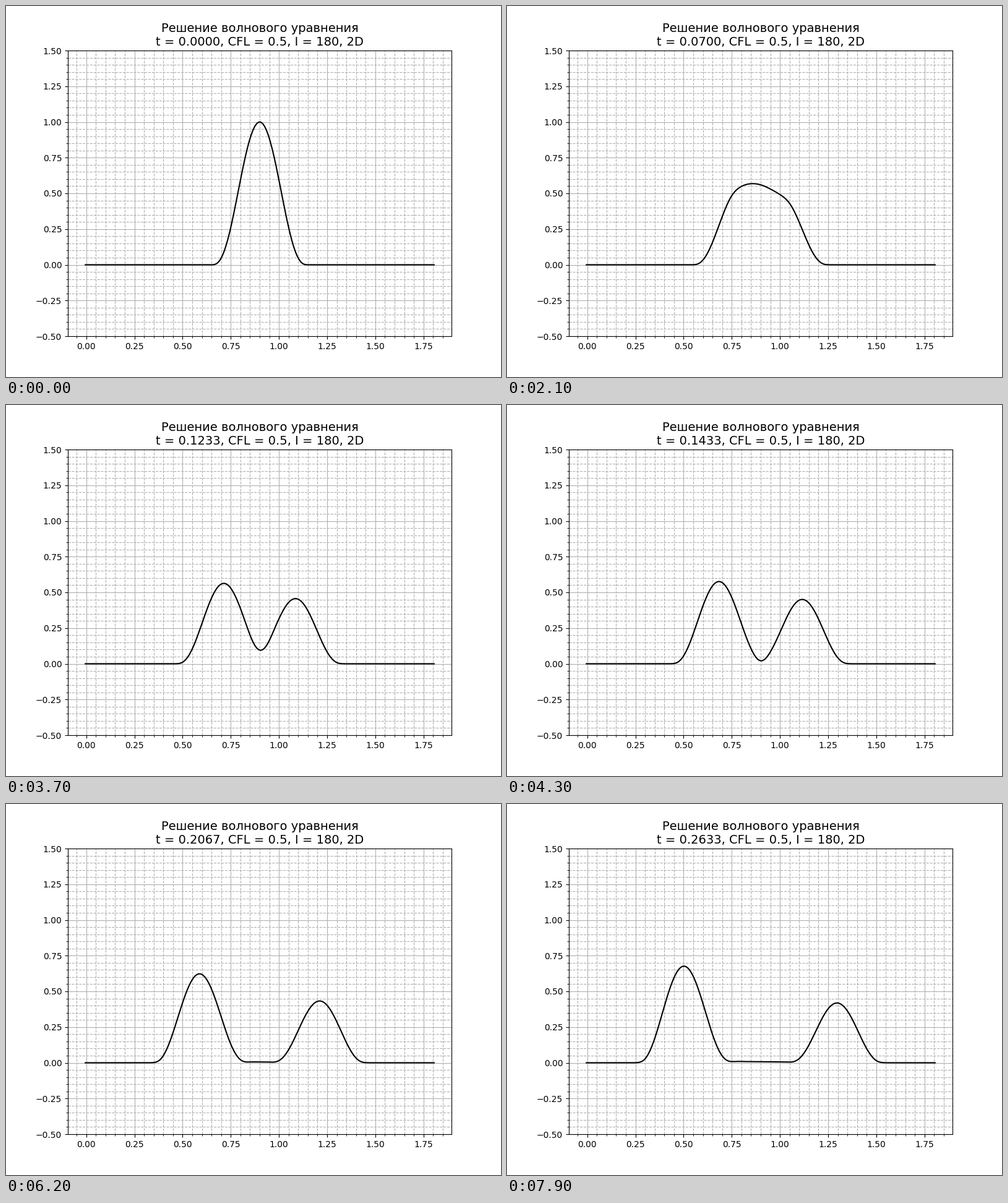
Animation of 800 by 600 pixels, one loop 8 s. Source, as a matplotlib script:

```python
import numpy as np
import matplotlib.pyplot as plt
from matplotlib.animation import FuncAnimation

# Radial wave equation u_tt = c^2 (r u_r)_r / r, explicit finite volumes
I, CFL, C = 180, 0.5, 1.5
R_MAX, R1, R2 = 1.8, 0.65, 1.15
STEPS = 80

h = R_MAX / I
dt = CFL * h / C
r = (np.arange(I + 2) - 0.5) * h  # one ghost cell at each end


def pulse(r):
    s = (2 * r - R1 - R2) / (R2 - R1)
    return np.clip(1 - s**2, 0, None) ** 3


def divergence(u):
    flux = (r[:-1] + h / 2) * np.diff(u)
    return CFL**2 * np.diff(flux) / r[1:-1]


def close_ends(u):
    u[0], u[-1] = u[1], u[-2]
    return u


def solve():
    layers = [pulse(r)]
    first = layers[0].copy()
    first[1:-1] += divergence(first) / 2  # zero initial velocity
    layers.append(close_ends(first))
    while len(layers) < STEPS:
        old, cur = layers[-2:]
        new = 2 * cur - old
        new[1:-1] = 2 * cur[1:-1] - old[1:-1] + divergence(cur)
        layers.append(close_ends(new))
    return layers


def caption(n):
    return ("Решение волнового уравнения\n"
            f"t = {n * dt:.4f}, CFL = {CFL}, I = {I}, 2D")


layers = solve()

fig, ax = plt.subplots(figsize=(8, 6), dpi=100)
line, = ax.plot(r, layers[0], color="black", lw=1.5)
ax.set_ylim(-0.5, 1.5)
ax.minorticks_on()
ax.grid(which="major")
ax.grid(which="minor", linestyle="--")
title = ax.set_title(caption(0), fontsize=14)


def update(n):
    line.set_ydata(layers[n])
    title.set_text(caption(n))
    return line, title


anim = FuncAnimation(fig, update, frames=STEPS, interval=100,
                     repeat=True, repeat_delay=0)
plt.show()
```
